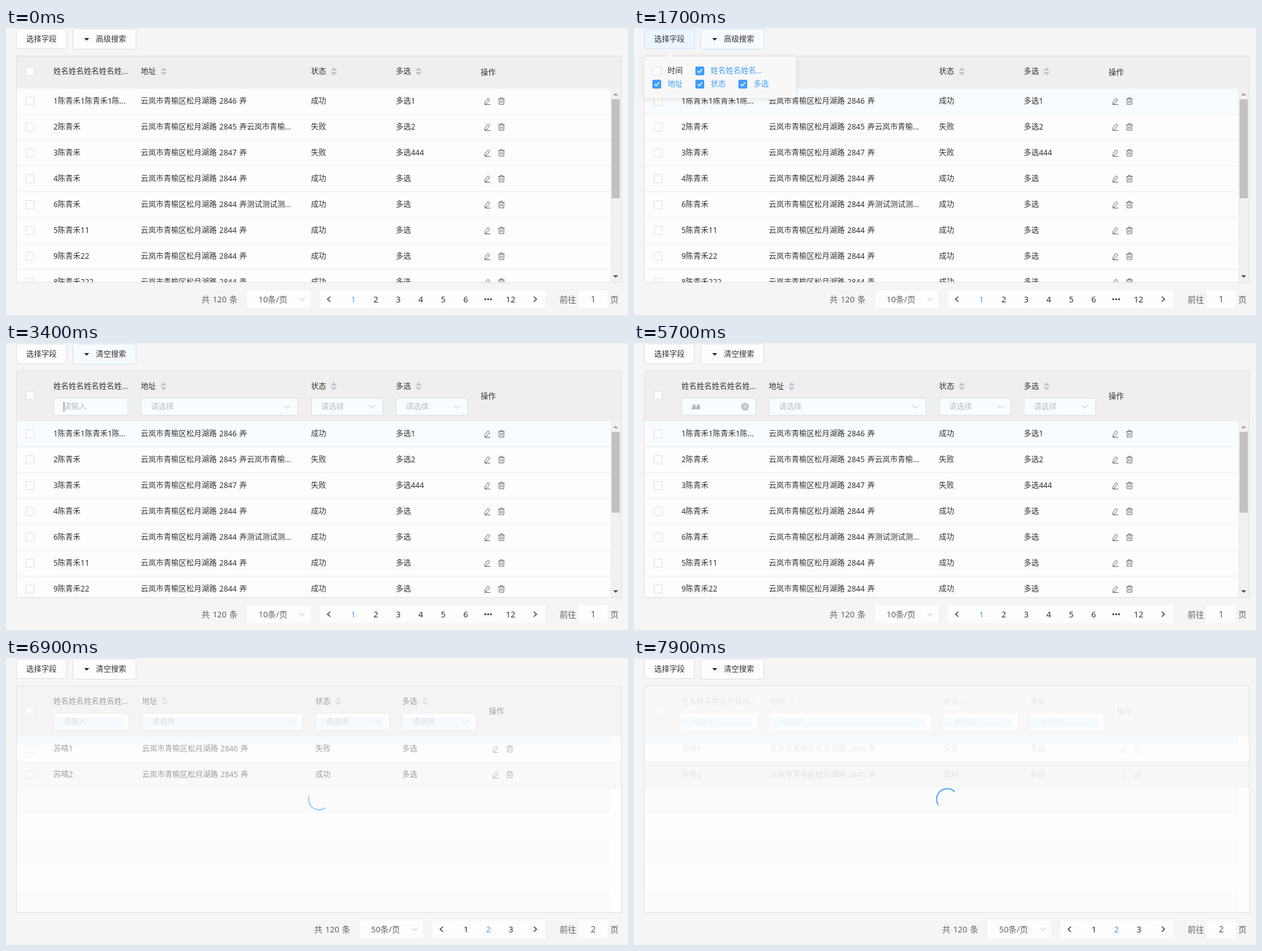
An HTML page that plays this animation: 983x455 px, repeating every 8000 ms.

```html
<!DOCTYPE html>
<html lang="zh-CN">
<head>
<meta charset="utf-8">
<title>Table search</title>
<style>
html, body { margin: 0; width: 100%; height: 100%; overflow: hidden; background: #f5f5f5; }
svg { display: block; width: 983px; height: 455px; }
text { font: 12px "Noto Sans", "Noto Sans CJK SC", "Noto Sans CJK", sans-serif; fill: #333; }
.addr { word-spacing: 1px; }
.hint { fill: #b9bdc5; }
.page { font-size: 13px; fill: #606266; word-spacing: 1px; }
.num { font-size: 13px; fill: #303133; text-anchor: middle; }
.blue { fill: #409eff; }
.line { fill: none; stroke-width: 1; }
</style>
</head>
<body>
<svg id="stage" viewBox="0 0 983 455" xmlns="http://www.w3.org/2000/svg"></svg>
<script>
const LOOP = 8000, STEP = 100;
const ROAD = '云岚市青榆区松月湖路';

// Drawing helpers; text is placed by its vertical centre.
const rect = (x, y, w, h, fill, extra = '') =>
  `<rect x="${x}" y="${y}" width="${w}" height="${h}" fill="${fill}" ${extra}/>`;
const box = (x, y, w, h, fill, stroke, r = 0, extra = '') =>
  rect(x + .5, y + .5, w - 1, h - 1, fill, `stroke="${stroke}" rx="${r}" ${extra}`);
const text = (x, cy, s, cls = '') => `<text x="${x}" y="${cy + 4}" class="${cls}">${s}</text>`;
const line = (d, color, extra = '') => `<path class="line" d="${d}" stroke="${color}" ${extra}/>`;
const shape = (d, fill) => `<path d="${d}" fill="${fill}"/>`;
const group = (id, body, extra = '') => `<g id="${id}" ${extra}>${body}</g>`;
const chevron = (x, y, w = 5) => line(`M${x - w} ${y - w / 2}l${w} ${w}l${w} ${-w}`, '#b9bdc5');

function checkbox(x, cy, on) {
  return box(x, cy - 7, 14, 14, on ? '#409eff' : '#fdfdfd', on ? '#409eff' : '#dcdfe6', 1.5) +
    (on ? line(`M${x + 3.5} ${cy}l2.6 2.8l4.6 -5.6`, '#fff', 'style="stroke-width:1.4"') : '');
}

const sorter = (x, y) =>
  shape(`M${x - 5} ${y - 1.5}l5 -5l5 5zM${x - 5} ${y + 1}l5 5l5 -5z`, '#c0c4cc');

function actions(x, y) {
  const pencil = `M${x - 4} ${y + 1.5}l4.5 -6.2l3 2.1l-4.5 6.2l-3.2 1.1zM${x - 4.5} ${y + 5.5}h9`;
  const tx = x + 22;
  const bin = `M${tx - 5} ${y - 3.5}h10M${tx - 2} ${y - 3.5}v-1.8h4v1.8M${tx - 3.8} ${y - 3.5}v8.6h7.6v-8.6` +
    `M${tx - 1.2} ${y - 1.5}v4.5M${tx + 1.2} ${y - 1.5}v4.5`;
  return line(pencil + bin, '#606266', 'style="stroke-width:.95"');
}

// Column starts: name, address, state, multi, actions; and right edges of the filters.
const WIDE = { x: [75, 213, 482, 616, 750], end: [193, 462, 596, 730] };
const FULL = { x: [75, 215, 489, 626, 763], end: [195, 469, 606, 743] };

const person = '陈青禾';
const addr = (n, more = '') => `${ROAD} ${n} 弄${more}`;
const firstRows = [
  [`1${person}1${person}1陈...`, addr(2846), '成功', '多选1'],
  [`2${person}`, addr(2845, '云岚市青榆...'), '失败', '多选2'],
  [`3${person}`, addr(2847), '失败', '多选444'],
  [`4${person}`, addr(2844), '成功', '多选'],
  [`6${person}`, addr(2844, '测试测试测...'), '成功', '多选'],
  [`5${person}11`, addr(2844), '成功', '多选'],
  [`9${person}22`, addr(2844), '成功', '多选'],
  [`8${person}222`, addr(2844), '成功', '多选']
];
const foundRows = [
  ['苏晴1', addr(2846), '失败', '多选'],
  ['苏晴2', addr(2845), '成功', '多选']
];

function scrollbar(top) {
  const thumb = top === 96 ? 157 : 128;
  return rect(955, top, 17, 403 - top, '#f1f1f1') +
    rect(957, top + 17, 13, thumb, '#c1c1c1') +
    shape(`M959.5 ${top + 11}l4 -4l4 4z`, '#a3a3a3') +
    shape('M959.5 392l4 4l4 -4z', '#505050');
}

function table(cols, rows, filters, scroll) {
  const top = filters ? 124 : 96, mid = filters ? 83 : 69, { x, end } = cols;
  let s = rect(17, 45, 955, 358, '#fdfdfd') + rect(17, 45, 955, top - 45, '#efefef');
  s += checkbox(31, mid, false) + text(x[0], 69, '姓名姓名姓名姓名姓...');
  ['地址', '状态', '多选'].forEach((name, i) =>
    s += text(x[i + 1], 69, name) + sorter(x[i + 1] + 36, 69));
  s += text(x[4], mid + 2, '操作');
  if (filters) end.forEach((e, i) => {
    s += box(x[i], 87, e - x[i], 28, '#f8fcff', '#dcdfe6');
    if (i) s += text(x[i] + 16, 101, '请选择', 'hint') + chevron(e - 17.5, 101);
  });
  rows.forEach((row, i) => {
    const y = top + i * 41, cy = y + 20;
    if (!i) s += rect(17, y, 955, 40, '#f8fcff', 'class="hover"');
    s += checkbox(31, cy, false);
    row.forEach((cell, c) => s += text(x[c], cy, cell, c === 1 ? 'addr' : ''));
    s += actions(x[4] + 11, cy) + rect(17, y + 40, 955, 1, '#ebeef5');
  });
  return `<g clip-path="url(#frame)">${s}${scroll ? scrollbar(top) : ''}</g>`;
}

function pager(shift, size, pages, current) {
  const left = 496 + shift, mid = 431;
  let s = text(309 + shift, mid, '共 120 条', 'page') + rect(381 + shift, 416, 100, 28, '#fdfdfd') +
    text(399 + shift, mid, size + '条/页', 'page') + chevron(468 + shift, 430, 4) +
    rect(left, 416, 852 - left, 28, '#fdfdfd') +
    line(`M${left + 16.5} 426l-4.5 4l4.5 4M834 426l4.5 4l-4.5 4`, '#303133', 'style="stroke-width:1.3"');
  pages.forEach((p, i) => {
    const cx = left + 53 + i * 35.5;
    s += p ? text(cx, mid, p, 'num' + (p === current ? ' blue' : ''))
      : [-4.5, 0, 4.5].map(d => `<circle cx="${cx + d}" cy="430" r="1.5" fill="#303133"/>`).join('');
  });
  return s + text(875, mid, '前往', 'page') + rect(905, 416, 46, 28, '#fdfdfd') +
    `<text x="928" y="435" class="num" style="fill:#606266;font-size:14px">${current}</text>` +
    text(955, mid, '页', 'page');
}

function popover() {
  const items = [[29, 68, '时间'], [97, 68, '姓名姓名姓名...', 1],
    [29, 89, '地址', 1], [97, 89, '状态', 1], [165, 89, '多选', 1]];
  return rect(16, 45, 240, 66, '#fff', 'id="card" rx="4" filter="url(#shadow)"') +
    shape('M50 45.5l6 -6l6 6z', '#f9f9f9') +
    items.map(([x, y, s, on]) => checkbox(x, y, on) + text(x + 24, y, s, on ? 'blue' : '')).join('');
}

function mask() {
  let s = rect(17, 45, 955, 358, '#fff') + rect(17, 45, 955, 79, '#fafafa') +
    rect(17, 124, 938, 13, '#f7fbff') + rect(17, 164, 955, 42, '#f7f7f7');
  FULL.end.forEach((e, i) => s += rect(FULL.x[i], 88, e - FULL.x[i], 26, '#fff') +
    rect(FULL.x[i] + 1, 95, e - FULL.x[i] - 10, 15, '#f5faff'));
  return s;
}

const bands = [[206, 40, '#fbfbfb'], [246, 42, '#fefefe'], [288, 40, '#fcfcfc'],
  [328, 42, '#fefefe'], [370, 33, '#fbfbfb']];

const stage = document.getElementById('stage');
stage.innerHTML =
  '<defs><clipPath id="frame"><rect x="17" y="45" width="955" height="358"/></clipPath>' +
  '<filter id="shadow" x="-20%" y="-40%" width="140%" height="180%">' +
  '<feDropShadow dx="0" dy="2" stdDeviation="5" flood-color="#000" flood-opacity=".1"/></filter></defs>' +
  rect(0, 0, 983, 455, '#f5f5f5') +
  box(16, 1, 80, 32, '#fdfdfd', '#dcdfe6', 2, 'id="fieldBtn"') + text(32, 18, '选择字段') +
  box(105, 1, 101, 33, '#fdfdfd', '#dcdfe6', 2, 'id="searchBtn"') +
  shape('M123.5 16l4 4l4 -4z', '#222') +
  group('openLabel', text(142, 18, '高级搜索')) + group('clearLabel', text(142, 18, '清空搜索')) +
  group('compact', table(WIDE, firstRows, false, true)) +
  group('filtered', table(WIDE, firstRows, true, true)) +
  group('found', table(FULL, foundRows, true, false)) +
  group('hint', text(91, 101, '请输入', 'hint')) +
  '<text id="typed" x="91" y="105" style="fill:#606266"></text>' +
  group('clear', '<circle cx="175.5" cy="101" r="6.3" fill="#c0c4cc"/>' +
    line('M173.3 98.8l4.4 4.4M177.7 98.8l-4.4 4.4', '#fff')) +
  rect(91, 93, 1, 16, '#777', 'id="caret"') +
  group('mask', mask()) +
  group('bands', rect(17, 206, 955, 197, '#fefefe') + bands.map(([y, h, c]) => rect(17, y, 938, h, c)).join('')) +
  group('spinner', '<circle id="arc" r="20" fill="none" stroke="#409eff" stroke-width="2" stroke-linecap="round"/>') +
  box(16, 44, 957, 360, 'none', '#e0e1e4') +
  group('pagerA', pager(0, 10, [1, 2, 3, 4, 5, 6, 0, 12], 1)) +
  group('pagerB', pager(178, 50, [1, 2, 3], 2)) +
  group('popover', popover());

const el = id => document.getElementById(id);
const show = (id, on) => el(id).style.display = on ? '' : 'none';
const clamp = v => Math.min(1, Math.max(0, v));
const within = (t, a, b) => t >= a && t < b;

// Inverse of cubic-bezier(.42, 0, .58, 1) by bisection.
function easeInOut(x) {
  let a = 0, b = 1, s = .5;
  for (let i = 0; i < 20; i++) {
    s = (a + b) / 2;
    const u = 1 - s;
    if (3 * u * u * s * .42 + 3 * u * s * s * .58 + s * s * s < x) a = s; else b = s;
  }
  return s * s * (3 - 2 * s);
}

function spin(ms) {
  const p = ms % 1500 / 750, grow = easeInOut(clamp(p)), run = easeInOut(clamp(p - 1));
  el('arc').setAttribute('stroke-dasharray', `${1 + 89 * grow} 200`);
  el('arc').setAttribute('stroke-dashoffset', -40 * grow - 80 * run);
  el('spinner').setAttribute('transform', `translate(495 224) rotate(${ms * .18}) scale(.84)`);
}

function paintButton(id, fill, stroke) {
  el(id).setAttribute('fill', fill);
  el(id).setAttribute('stroke', stroke);
}

function draw(t) {
  const expanded = t >= 2200, found = t >= 6200;
  show('compact', !expanded);
  show('filtered', expanded && !found);
  show('found', found);
  show('openLabel', !expanded);
  show('clearLabel', expanded);
  show('pagerA', !found);
  show('pagerB', found);
  show('bands', found);
  stage.querySelector('.hover').style.display = t >= 700 ? '' : 'none';

  const fieldOn = within(t, 600, 2300), searchOn = within(t, 1700, 4900);
  paintButton('fieldBtn', fieldOn ? '#ecf5ff' : '#fdfdfd', fieldOn ? '#c6e2ff' : '#dcdfe6');
  paintButton('searchBtn', searchOn ? '#f7fbff' : '#fdfdfd', searchOn ? '#cfe3f7' : '#dcdfe6');

  el('popover').style.opacity = t < 2200 ? clamp((t - 600) / 400) : clamp((2500 - t) / 400);
  const tone = 255 - 7 * clamp((t - 1200) / 300);
  el('card').setAttribute('fill', `rgb(${tone},${tone},${tone})`);

  const typed = within(t, 4900, 6200) ? (t < 5200 ? 'a' : 'aa') : '';
  el('typed').textContent = typed;
  show('hint', expanded && !typed);
  show('clear', typed);
  show('caret', within(t, 3400, 3900) || within(t, 4400, 5700));
  el('caret').setAttribute('x', 91 + 7 * typed.length);

  const again = t >= 7600;
  const fade = again ? clamp((t - 7500) / 300)
    : clamp((t - 5800) / 300) * clamp((7200 - t) / 500);
  el('mask').style.opacity = .9 * fade;
  el('spinner').style.opacity = fade;
  spin(Math.max(0, t - (again ? 7470 : 5800)));
}

const start = performance.now();
function tick() {
  const t = (performance.now() - start) % LOOP;
  draw(Math.floor(t / STEP) * STEP);
  requestAnimationFrame(tick);
}
tick();
</script>
</body>
</html>
```
